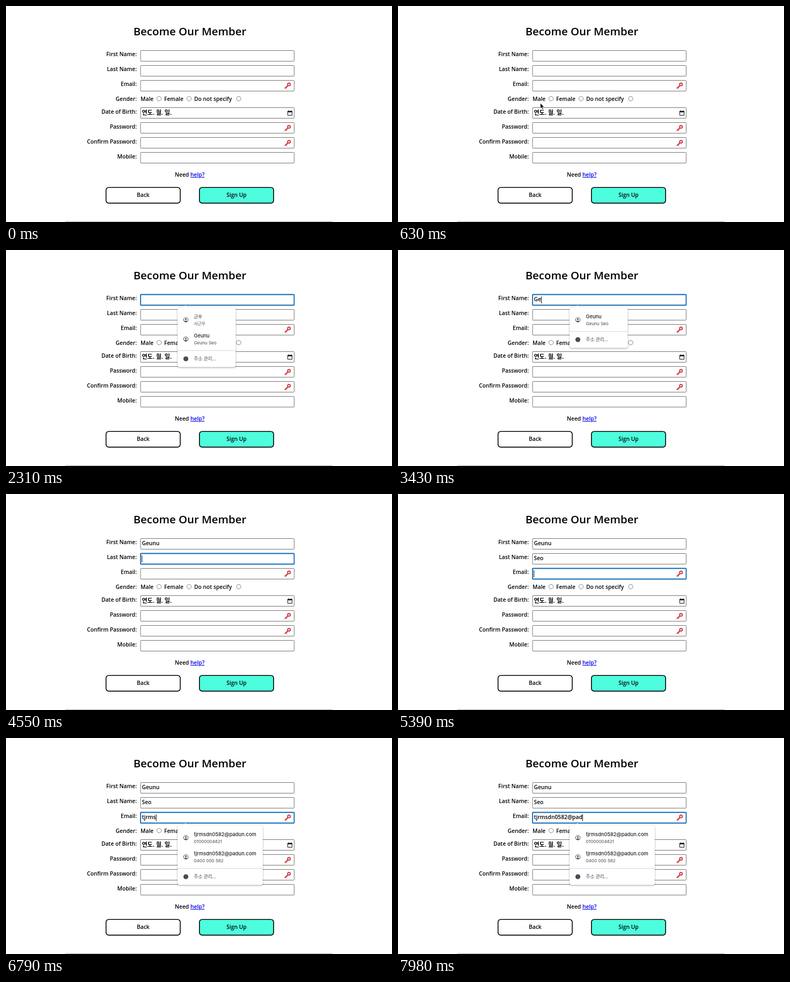
Animation, 720 px wide and 405 px high, one loop 8 s. Source, as an HTML page:

```html
<!DOCTYPE html>
<html lang="en">
<head>
<meta charset="utf-8">
<title>Become Our Member</title>
<style>
  html, body { margin: 0; width: 100%; height: 100%; overflow: hidden; background: #fff; }
  svg { display: block; width: 100vw; height: 100vh; }
  text { font: 600 10.25px "Open Sans", "Noto Sans CJK KR", "Noto Sans CJK", sans-serif; fill: #000; white-space: pre; }
  .title { font-size: 20.4px; }
  .date { font-size: 11px; font-weight: 700; }
  .link { fill: #0000ee; text-decoration: underline; }
  .field { fill: #fff; stroke: #737373; stroke-width: 1; }
  .focus { stroke: #0a66b8; stroke-width: 1.8; }
  .main, .sub { font-family: Inter, "Noto Sans CJK KR", "Noto Sans CJK", sans-serif; }
  .main { font-size: 9.3px; font-weight: 500; fill: #202124; }
  .sub { font-size: 8.1px; font-weight: 400; fill: #45484c; }
  .ko.main { font-size: 8.4px; }
  .ko.sub { font-size: 7.8px; }
  .manage.sub { font-size: 8.6px; }
  .popup { filter: drop-shadow(0 1px 1.6px rgba(0, 0, 0, .38)); }
</style>
</head>
<body>
<svg id="stage" viewBox="0 0 720 405"></svg>
<script>
const LOOP = 8000, STEP = 70;
const stage = document.getElementById('stage');

function add(parent, tag, attrs, content) {
  const el = document.createElementNS('http://www.w3.org/2000/svg', tag);
  for (const k in attrs) el.setAttribute(k, attrs[k]);
  if (content !== undefined) el.textContent = content;
  parent.appendChild(el);
  return el;
}
const write = (parent, x, y, content, cls = '', anchor = 'start') =>
  add(parent, 'text', { x, y, class: cls, 'text-anchor': anchor }, content);
const show = (el, on) => el.setAttribute('visibility', on ? 'visible' : 'hidden');

// ---- form ----
write(stage, 343, 55, 'Become Our Member', 'title', 'middle');

const labels = [
  ['First Name:', 94], ['Last Name:', 122], ['Email:', 150], ['Gender:', 178],
  ['Date of Birth:', 202], ['Password:', 230], ['Confirm Password:', 258], ['Mobile:', 286]
];
for (const [name, y] of labels) write(stage, 244, y, name, '', 'end');

const tops = [83.5, 111.5, 139.5, 190.5, 218.5, 246.5, 274.5];
const fields = tops.map(y =>
  add(stage, 'rect', { x: 251, y, width: 286.5, height: 20, rx: .8, class: 'field' }));

for (const [name, x, cx] of [['Male', 251, 285.5], ['Female', 295, 341.5], ['Do not specify', 351, 434]]) {
  write(stage, x, 178, name);
  add(stage, 'circle', { cx, cy: 173.7, r: 4.2, fill: '#fff', stroke: '#737373', 'stroke-width': .9 });
}

write(stage, 253.5, 204, '연도. 월. 일.', 'date');
add(stage, 'path', { d: 'M525.6 197.4h8v7.6h-8z', fill: 'none', stroke: '#000', 'stroke-width': 1 });
add(stage, 'path', { d: 'M525.2 197h8.8v2.3h-8.8zM526.6 195.8h1.2v1.5h-1.2zM531.4 195.8h1.2v1.5h-1.2z' });

for (const y of [149, 228.5, 256.5]) {
  const key = add(stage, 'g', {
    transform: `translate(525.4 ${y})`, fill: 'none', stroke: '#d23a44', 'stroke-width': 2
  });
  add(key, 'circle', { cx: 2.4, cy: -2, r: 2.5 });
  add(key, 'path', { d: 'M.6 -.2L-5.4 5.4M-4.2 3.6l1.8 1.8M-2 1.8l1.5 1.5' });
}

write(stage, 315, 320, 'Need ');
write(stage, 344, 320, 'help?', 'link');

for (const [name, x, fill] of [['Back', 186.6, '#fff'], ['Sign Up', 360.8, '#4dfddd']]) {
  add(stage, 'rect', {
    x, y: 340.2, width: 138.4, height: 29.4, rx: 5, fill, stroke: '#000', 'stroke-width': 1.6
  });
  write(stage, x + 69.2, 357.5, name, '', 'middle');
}
add(stage, 'path', { d: 'M111 404.5H609', stroke: '#a9a9a9', 'stroke-width': 1 });

// ---- typed values and caret ----
const inputs = [96, 124, 152].map(y => write(stage, 253.5, y, ''));
const caret = add(stage, 'path', { stroke: '#000', 'stroke-width': 1 });

// ---- suggestion popups ----
function popup(y, width, items) {
  const g = add(stage, 'g', { transform: `translate(320 ${y})` });
  const height = 39.5 + 36 * items.length;
  const box = add(g, 'g', { class: 'popup', fill: '#fff' });
  add(box, 'rect', { y: 0, width, height, rx: 4 });
  add(box, 'path', { d: 'M8 .5L15 -4.5L22 .5Z' });
  items.forEach(([main, sub, cls = ''], i) => {
    const cy = 23 + 36 * i;
    add(g, 'circle', { cx: 15.5, cy, r: 4.1, fill: 'none', stroke: '#45484c', 'stroke-width': 1 });
    add(g, 'circle', { cx: 15.5, cy: cy - 1.1, r: 1.5, fill: '#45484c' });
    add(g, 'path', { d: `M12.5 ${cy + 2.8}q3 -2.6 6 0q-3 2.2 -6 0`, fill: '#45484c' });
    write(g, 30.5, cy - 2.8, main, 'main ' + cls);
    write(g, 30.5, cy + 10.3, sub, 'sub ' + cls);
  });
  const line = height - 31;
  add(g, 'path', { d: `M0 ${line}H${width}`, stroke: '#cbdcec', 'stroke-width': 1 });
  add(g, 'circle', { cx: 15.5, cy: line + 15.6, r: 4.6, fill: '#494c50' });
  write(g, 30.5, line + 18.7, '주소 관리...', 'sub manage');
  return g;
}

const mail = 'tjrmsdn0582@padun.com';
const person = ['Geunu', 'Geunu Seo'];
// [element, opens, closes]
const popups = [
  [popup(108, 108.5, [['근우', '서근우', 'ko'], person]), 2240, 3010],
  [popup(108, 108.5, [person]), 3010, 4550],
  [popup(136, 108.5, [['Seo', 'Geunu Seo']]), 5040, 5390],
  [popup(164, 159, [[mail, '01000004821'], [mail, '0400 000 582']]), 6020, LOOP]
];

// ---- pointer ----
const arrow = add(stage, 'path', {
  d: 'M0 0V10.4L2.4 8.2 4 11.7 5.8 10.9 4.3 7.5H7.4Z',
  fill: '#000', stroke: '#fff', 'stroke-width': .8
});
const beam = add(stage, 'path', {
  d: 'M-2 -5.5Q0 -5.5 0 -4.5Q0 -5.5 2 -5.5M0 -4.5V4.5M-2 5.5Q0 5.5 0 4.5Q0 5.5 2 5.5',
  fill: 'none', stroke: '#222', 'stroke-width': .8
});

// ---- timeline ----
const typing = [
  ['Geunu', [2870, 3290, 3500, 3780, 4060]],
  ['Seo', [4900, 5040, 5180]],
  [mail, [5950, 6370, 6510, 6650, 6790, 6860, 7000, 7140, 7210, 7350, 7490, 7630, 7770, 7840, 7980]]
];
const focusTimes = [2170, 4550, 5390];
const track = [[70, 420, 396], [1050, 165, 43], [1260, 308.5, 104.5], [1330, 308.5, 104.5], [1750, 304, 94]];

function pointerAt(t) {
  const i = track.findIndex(p => p[0] > t);
  if (i < 0) return track[track.length - 1].slice(1);
  const [t0, x0, y0] = track[i - 1], [t1, x1, y1] = track[i];
  const k = (t - t0) / (t1 - t0), e = k * k * (3 - 2 * k);
  return [x0 + (x1 - x0) * e, y0 + (y1 - y0) * e];
}

function draw(now) {
  const t = Math.floor((now % LOOP) / STEP) * STEP;

  const active = focusTimes.filter(f => t >= f).length - 1;
  fields.forEach((f, i) => f.setAttribute('class', i === active ? 'field focus' : 'field'));

  typing.forEach(([value, keys], i) => {
    inputs[i].textContent = value.slice(0, keys.filter(k => t >= k).length);
  });

  const blinkOff = t < 2520 || (t >= 2800 && t < 2870);
  show(caret, active >= 0 && !blinkOff);
  if (active >= 0) {
    const text = inputs[active];
    const x = 253.6 + (text.textContent ? text.getComputedTextLength() + .4 : 0);
    caret.setAttribute('d', `M${x} ${tops[active] + 3.5}v13`);
  }

  for (const [el, from, to] of popups) {
    show(el, t >= from && t < to);
    el.setAttribute('opacity', t < from + STEP && from !== 3010 ? .5 : 1);
  }

  const visible = t >= 70 && t < 2170;
  const [x, y] = visible ? pointerAt(t) : [0, 0];
  const inField = x > 251 && x < 537 && tops.some(top => y > top && y < top + 20);
  show(arrow, visible && !inField);
  show(beam, visible && inField);
  for (const el of [arrow, beam]) el.setAttribute('transform', `translate(${x} ${y})`);
}

const start = performance.now();
function tick() {
  draw(performance.now() - start);
  requestAnimationFrame(tick);
}
tick();
</script>
</body>
</html>
```
